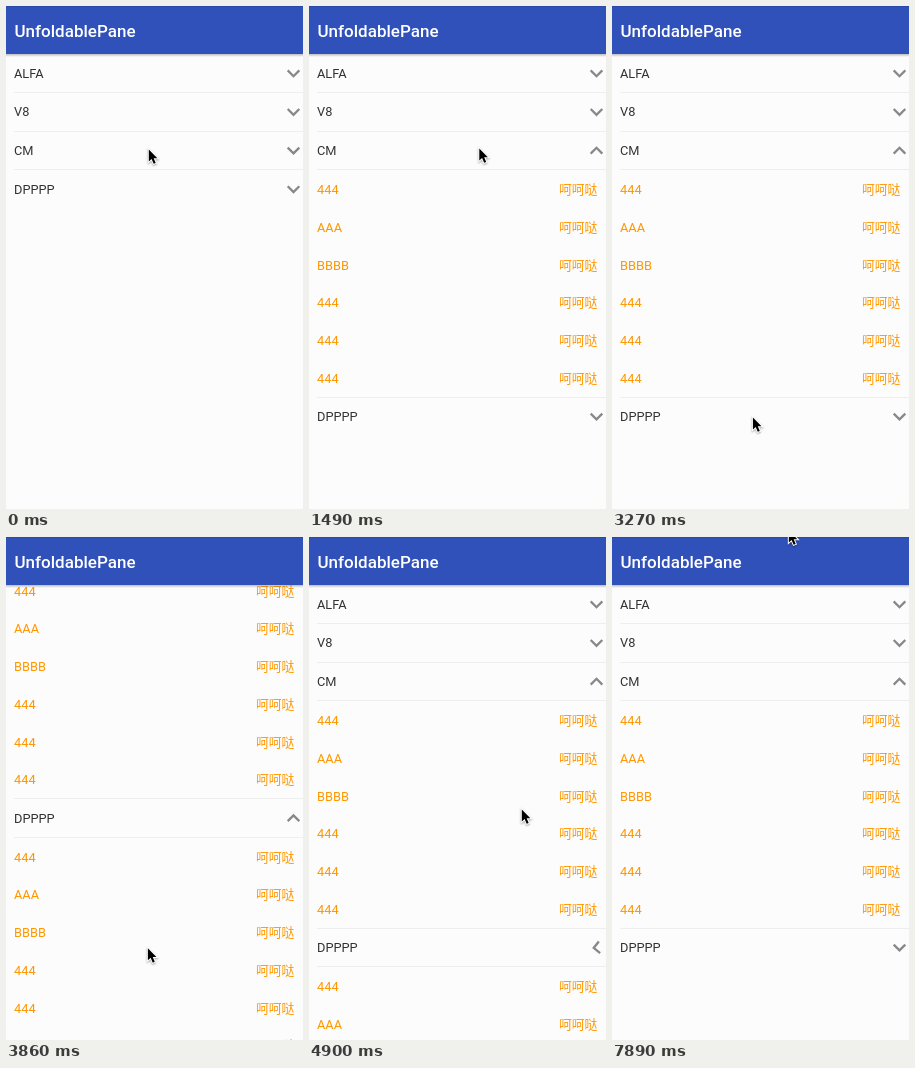
An HTML page with a canvas that plays this animation: 297x503 px, repeating every 8 s.

```html
<!DOCTYPE html>
<html lang="zh-CN">
<head>
<meta charset="utf-8">
<style>
  html, body { margin: 0; width: 100%; height: 100%; overflow: hidden; background: #fcfcfc; }
  canvas { display: block; }
</style>
</head>
<body>
<canvas id="stage" width="297" height="503"></canvas>
<script>
const W = 297, H = 503, LOOP = 8000, STEP = 148.87;
const BAR = 48, ROW = 38.6, CHILD = 37.75;
const FONT = '12.8px Roboto, "Noto Sans CJK SC", "Noto Sans CJK", sans-serif';
const groups = ['ALFA', 'V8', 'CM', 'DPPPP'];
const children = ['444', 'AAA', 'BBBB', '444', '444', '444'];
const PANEL = CHILD * children.length + 0.9; // rows plus closing divider
const ctx = document.getElementById('stage').getContext('2d');

const progress = (t, start, length) => Math.min(1, Math.max(0, (t - start) / length));
const ease = (t, start, length) => (1 - Math.cos(Math.PI * progress(t, start, length))) / 2;

// how far the third and fourth groups are open
const openness = (t, length) => [
  0, 0, ease(t, 850, length), ease(t, 3344, length) - ease(t, 4688, length)
];

// time, x, y of the pointer tip
const path = [
  [0, 142, 142], [140, 142, 142], [890, 169.5, 141], [1490, 169.5, 141],
  [2080, 172, 139], [2240, 172, 139], [3200, 140, 410], [3870, 141, 410],
  [4460, 212, 271], [4920, 212, 271], [5300, 190, 355], [5660, 156, 442],
  [6848, 153, 495], [7000, 149, 485], [7180, 155, 420], [7440, 148, 258], [7890, 176, -8]
];

function pointerAt(t) {
  const i = path.findIndex(p => p[0] > t);
  if (i < 0) return path[path.length - 1].slice(1);
  const [t0, x0, y0] = path[i - 1], [t1, x1, y1] = path[i];
  const k = progress(t, t0, t1 - t0);
  return [x0 + (x1 - x0) * k, y0 + (y1 - y0) * k];
}

function text(str, x, baseline, color) {
  ctx.fillStyle = color;
  ctx.fillText(str, x, Math.round(baseline));
}

function divider(y) {
  ctx.fillStyle = '#eeeeee';
  ctx.fillRect(8, Math.floor(y), W - 8, 1);
}

function chevron(y, turn) {
  ctx.save();
  ctx.translate(287.5, y);
  ctx.rotate(Math.PI * turn);
  ctx.beginPath();
  ctx.moveTo(-5.8, -3);
  ctx.lineTo(0, 2.8);
  ctx.lineTo(5.8, -3);
  ctx.strokeStyle = '#888888';
  ctx.lineWidth = 2.3;
  ctx.stroke();
  ctx.restore();
}

function drawChildren(top, height) {
  ctx.save();
  ctx.beginPath();
  ctx.rect(0, top, W, height);
  ctx.clip();
  children.forEach((name, i) => {
    const baseline = top + CHILD * i + 24.2;
    text(name, 8, baseline, '#ff9800');
    text('呵呵哒', 250, baseline, '#ff9800');
  });
  ctx.restore();
}

function drawList(open, turn, scroll) {
  let y = BAR - scroll;
  ctx.font = FONT;
  groups.forEach((name, i) => {
    if (i) divider(y);
    text(name, 8, y + 23.8, '#333333');
    chevron(y + 19.4, turn[i]);
    y += ROW;
    if (open[i] > 0) {
      const height = open[i] * PANEL;
      drawChildren(y, height);
      divider(y);
      y += height;
    }
  });
}

function drawBar() {
  const shade = ctx.createLinearGradient(0, BAR, 0, BAR + 3);
  shade.addColorStop(0, 'rgba(0,0,0,.25)');
  shade.addColorStop(1, 'rgba(0,0,0,0)');
  ctx.fillStyle = shade;
  ctx.fillRect(0, BAR, W, 3);
  ctx.fillStyle = '#3050ba';
  ctx.fillRect(0, 0, W, BAR);
  ctx.fillStyle = '#2a48a8';
  ctx.fillRect(0, 0, W, 1);
  ctx.fillStyle = '#ffffff';
  ctx.font = '500 17px Roboto, sans-serif';
  ctx.fillText('UnfoldablePane', 8.5, 31);
}

const arrow = new Path2D('M0 0V14.2L3.3 11.2L5.8 17L8.2 16L5.8 10.3H10.2Z');
function drawPointer([x, y]) {
  ctx.save();
  ctx.translate(x + 0.8, y + 1.5);
  ctx.scale(0.84, 0.84);
  ctx.shadowColor = 'rgba(0,0,0,.35)';
  ctx.shadowBlur = 2;
  ctx.shadowOffsetY = 1;
  ctx.strokeStyle = '#ffffff';
  ctx.lineWidth = 2.4;
  ctx.stroke(arrow);
  ctx.shadowColor = 'transparent';
  ctx.fillStyle = '#000000';
  ctx.fill(arrow);
  ctx.restore();
}

function draw(now) {
  const t = Math.floor((now % LOOP + 20) / STEP) * STEP;
  const open = openness(t, 360);
  const limit = Math.max(0, BAR + 4 * ROW + PANEL * (open[2] + open[3]) - H);
  const swipe = 1 - (1 - progress(t, 3620, 418)) ** 2;

  ctx.fillStyle = '#fcfcfc';
  ctx.fillRect(0, 0, W, H);
  drawList(open, openness(t, 430), Math.min(limit, 154.2 * swipe));
  drawBar();
  if (t < 5700 || t > 6800) drawPointer(pointerAt(t));
}

function tick() {
  draw(performance.now());
  requestAnimationFrame(tick);
}
tick();
</script>
</body>
</html>
```
